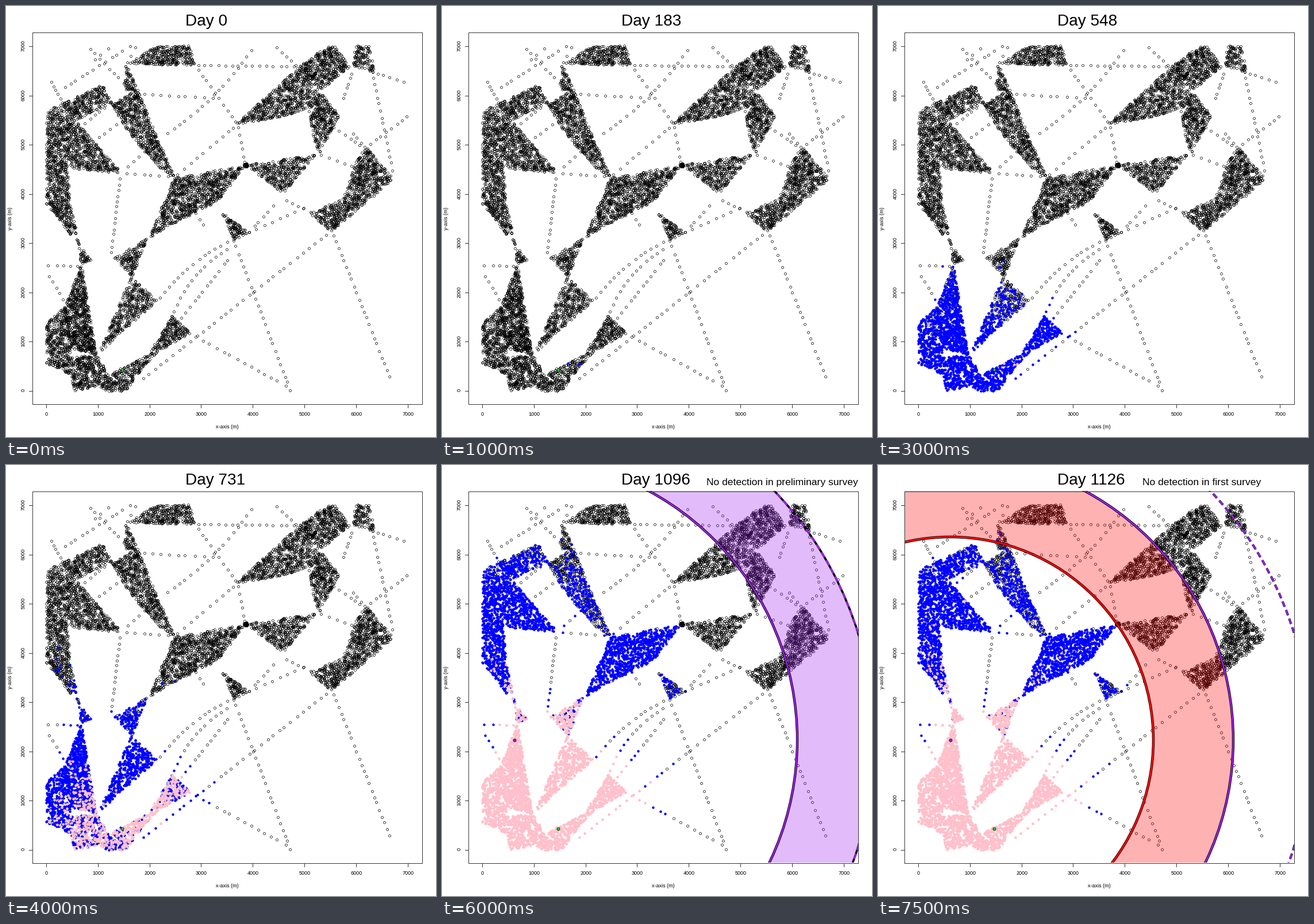
These frames come from a looping animation (748 px wide and 749 px high, 8 s). A matplotlib script:

```python
import numpy as np
import matplotlib.pyplot as plt
from matplotlib.animation import FuncAnimation
from matplotlib.patches import Circle, Rectangle, Wedge
from matplotlib.path import Path

W, H, DPI = 748, 749, 100
PX = 72 / DPI
LEFT, TOP, RIGHT, BOTTOM = 46, 45, 724, 691
HALF_YEAR, LATENCY = 182.75, 365
SPREAD = 1.2         # days for the epidemic to cross one pixel of woodland
HEDGE_SPREAD = 9     # the same across open land
NEVER = 2000
PURPLE, INK = "#a020f0", "#383838"
rng = np.random.default_rng(7)

plt.rcParams["font.family"] = "Liberation Sans"
fig = plt.figure(figsize=(W / DPI, H / DPI), dpi=DPI, facecolor="white")
ax = fig.add_axes([0, 0, 1, 1])
ax.set_xlim(0, W)
ax.set_ylim(H, 0)
ax.axis("off")

woods, wood_days, roads = [], [], []


def patch(day, *corners, density=.115):
    """Scatter trees in a polygon; infection enters at its first corner."""
    c = np.array(corners, float)
    lo, hi = c.min(0), c.max(0)
    p = rng.uniform(lo, hi, (int(density * np.prod(hi - lo)), 2))
    p = p[Path(c).contains_points(p)]
    woods.append(p)
    wood_days.append(day + SPREAD * np.hypot(*(p - c[0]).T))


def road(x0, y0, x1, y1, bend=0, step=12):
    """Single trees along a line, bowed sideways by bend pixels."""
    a, d = np.array([x0, y0]), np.array([x1 - x0, y1 - y0])
    length = np.hypot(*d)
    n = int(round(length / step)) + 1
    u = np.linspace(0, 1, n) + rng.uniform(-.2, .2, n) * step / length
    side = np.array([-d[1], d[0]]) / length
    bow = 4 * bend * u * (1 - u)
    roads.append(a + u[:, None] * d + bow[:, None] * side)


# Woodlands, from the first case outwards
patch(285, (247, 606), (289, 537), (320, 568), (265, 600), (240, 625),
      (208, 669), (177, 669), (177, 640))
patch(335, (177, 640), (177, 669), (158, 661), (118, 669), (113, 640),
      (70, 622), (70, 550), (103, 522), (112, 594), (110, 608), (162, 608))
patch(370, (157, 607), (112, 594), (100, 525), (131, 449), density=.16)
patch(430, (161, 603), (186, 543), (217, 470), (263, 512), (212, 557), density=.1)
patch(650, (219, 471), (188, 438), (246, 403))
patch(680, (129, 440), (126, 412), (147, 441), (132, 450))
patch(760, (128, 416), (105, 388), (70, 343), (70, 183), (168, 136),
      (183, 168), (121, 198), (141, 221), (201, 290), (107, 282), (112, 345))
patch(810, (247, 404), (292, 299), (416, 276), (370, 338), (297, 375))
patch(1060, (230, 241), (203, 205), (184, 169), (217, 151), (206, 143),
      (208, 98), (229, 146), (256, 212), (294, 299), (270, 284))
patch(1080, (376, 360), (425, 394), (395, 406))
patch(1230, (417, 276), (539, 257), (482, 326), density=.1)
patch(NEVER, (214, 100), (240, 81), (262, 70), (320, 69), (328, 103), (280, 102))
patch(NEVER, (398, 206), (508, 107), (555, 71), (572, 69), (598, 105),
      (545, 148), (580, 190), (566, 216), (546, 253), (540, 251), (524, 176),
      (490, 190))
patch(NEVER, (602, 106), (608, 69), (632, 69), (641, 118), (622, 108))
patch(NEVER, (628, 247), (675, 300), (566, 392), (527, 360), (586, 335),
      (600, 292), (615, 255))
patch(NEVER, (413, 275), (419, 274), (420, 279), (414, 280), density=1.2)

# Hedgerows
road(79, 132, 98, 167, step=8)
road(101, 142, 214, 71)
road(147, 75, 203, 133)
road(176, 75, 155, 93)
road(224, 74, 212, 96)
road(334, 103, 500, 105)
road(334, 110, 400, 202)
road(427, 76, 280, 222, bend=-10, step=13)
road(472, 73, 503, 102)
road(238, 153, 358, 160, step=16)
road(404, 212, 415, 272)
road(300, 291, 396, 211, step=14)
road(209, 291, 284, 296, step=15)
road(198, 300, 183, 427, step=10)
road(211, 280, 240, 254)
road(137, 204, 180, 169)
road(150, 237, 193, 205)
road(601, 118, 587, 160, step=9)
road(639, 124, 672, 284)
road(634, 240, 699, 191)
road(645, 117, 693, 132)
road(571, 211, 617, 243)
road(550, 260, 600, 278)
road(604, 222, 624, 245)
road(557, 398, 239, 647, step=13)
road(570, 398, 667, 644)
road(396, 408, 494, 667)
road(318, 568, 485, 659, step=14)
road(268, 507, 396, 405, bend=-10)
road(292, 531, 386, 422, bend=-12)
road(306, 541, 386, 441)
road(424, 392, 463, 349)
road(424, 393, 516, 352, step=14)
road(486, 337, 528, 357)
road(331, 362, 343, 380)
road(75, 451, 125, 452)
road(75, 469, 98, 508)

wood, hedge = np.concatenate(woods), np.concatenate(roads)
wood_day = np.concatenate(wood_days)

# A hedgerow tree catches it from the nearest woodland
gap = np.hypot(*(hedge[:, None] - wood[None]).transpose(2, 0, 1))
near = gap.argmin(1)
hedge_day = wood_day[near] + HEDGE_SPREAD * gap.min(1)

trees = np.concatenate([wood, hedge])
onset = np.concatenate([wood_day + rng.normal(0, 63, len(wood)),
                        hedge_day + rng.normal(0, 110, len(hedge))])
onset = np.maximum(onset, 60)

# Plot frame and axes
box = Rectangle((LEFT, TOP), RIGHT - LEFT, BOTTOM - TOP, transform=ax.transData)


def stroke(xs, ys):
    ax.plot(np.array(xs) + .5, np.array(ys) + .5, color=INK, lw=PX, zorder=9)


def label(x, y, text, size, **kw):
    return ax.text(x, y, text, fontsize=size * PX, color="black", **kw)


stroke([LEFT, RIGHT, RIGHT, LEFT, LEFT], [TOP, TOP, BOTTOM, BOTTOM, TOP])
mid = dict(ha="center", va="center")
for k in range(8):
    x, y = round(70 + 89.8 * k), round(667.5 - 85.45 * k)
    stroke([x, x], [BOTTOM, BOTTOM + 6])
    stroke([LEFT - 6, LEFT], [y, y])
    label(x + .5, 709.5, str(1000 * k), 9, **mid)
    label(30, y, str(1000 * k), 9, rotation=90, **mid)
label(385, 732, "x-axis (m)", 9, **mid)
label(8, 369, "y-axis (m)", 9, rotation=90, **mid)
title = label(312, 34, "", 28, va="baseline")
note = label(460, 35, "", 17.5, va="baseline")


def dots(size, zorder, face, edge="none", width=0.):
    line, = ax.plot([], [], "o", ms=size * PX, mfc=face, mec=edge,
                    mew=width * PX, zorder=zorder)
    return line


healthy = dots(4, 2, "none", "black", .7)
infected = dots(4.4, 3, "blue")
symptomatic = dots(4.6, 4, "pink")
first_case = dots(5, 8, "#22dd22", "black", .8)
first_case.set_data([202], [632])
found = dots(5, 8, PURPLE, "black", .8)

CENTER = (126, 478)
R_IN, R_MID, R_OUT = 353, 492, 626


def clipped(artist):
    ax.add_patch(artist)
    artist.set_clip_path(box)
    return artist


def ring(outer, inner, color):
    return clipped(Wedge(CENTER, outer, 0, 360, width=outer - inner,
                         fc=color, ec="none", alpha=.3, zorder=5))


def outline(r, color, width, dashed=False):
    w = width * PX
    style = (0, (10 * PX / w, 6 * PX / w)) if dashed else "-"
    return clipped(Circle(CENTER, r, fill=False, ec=color, lw=w, ls=style, zorder=6))


middle = [outline(R_MID, "black", 4.4), outline(R_MID, PURPLE, 2.6)]
preliminary = [ring(R_OUT, R_MID, PURPLE), outline(R_OUT, "black", 3.6),
               outline(R_OUT, PURPLE, 3, True)]
first = [ring(R_MID, R_IN, "red"), outline(R_IN, "black", 4.6),
         outline(R_IN, "red", 3), outline(R_OUT, "black", 4, True),
         outline(R_OUT, PURPLE, 2.8, True)]


def show(artists, on):
    for a in artists:
        a.set_visible(on)


def update(i):
    # Half-yearly steps, then one more survey a month later
    half_years = min(i // 2, 6)
    survey = "first" if i == 15 else "preliminary" if half_years == 6 else ""
    day = int(half_years * HALF_YEAR + .5) - (half_years in (1, 2)) * (half_years == 2)
    day += 30 * (survey == "first") - (half_years == 6)
    if half_years == 6:
        day = 1126 if survey == "first" else 1096
    ill = onset <= day
    late = onset + LATENCY <= day
    healthy.set_data(*trees[~ill].T)
    infected.set_data(*trees[ill & ~late].T)
    symptomatic.set_data(*trees[late].T)
    title.set_text(f"Day {day}")
    note.set_text(f"No detection in {survey} survey" if survey else "")
    found.set_data([CENTER[0]], [CENTER[1]])
    show(middle + [found], bool(survey))
    show(preliminary, survey == "preliminary")
    show(first, survey == "first")
    return []


anim = FuncAnimation(fig, update, frames=16, interval=500, repeat=True,
                     repeat_delay=0, cache_frame_data=False)
plt.show()
```
